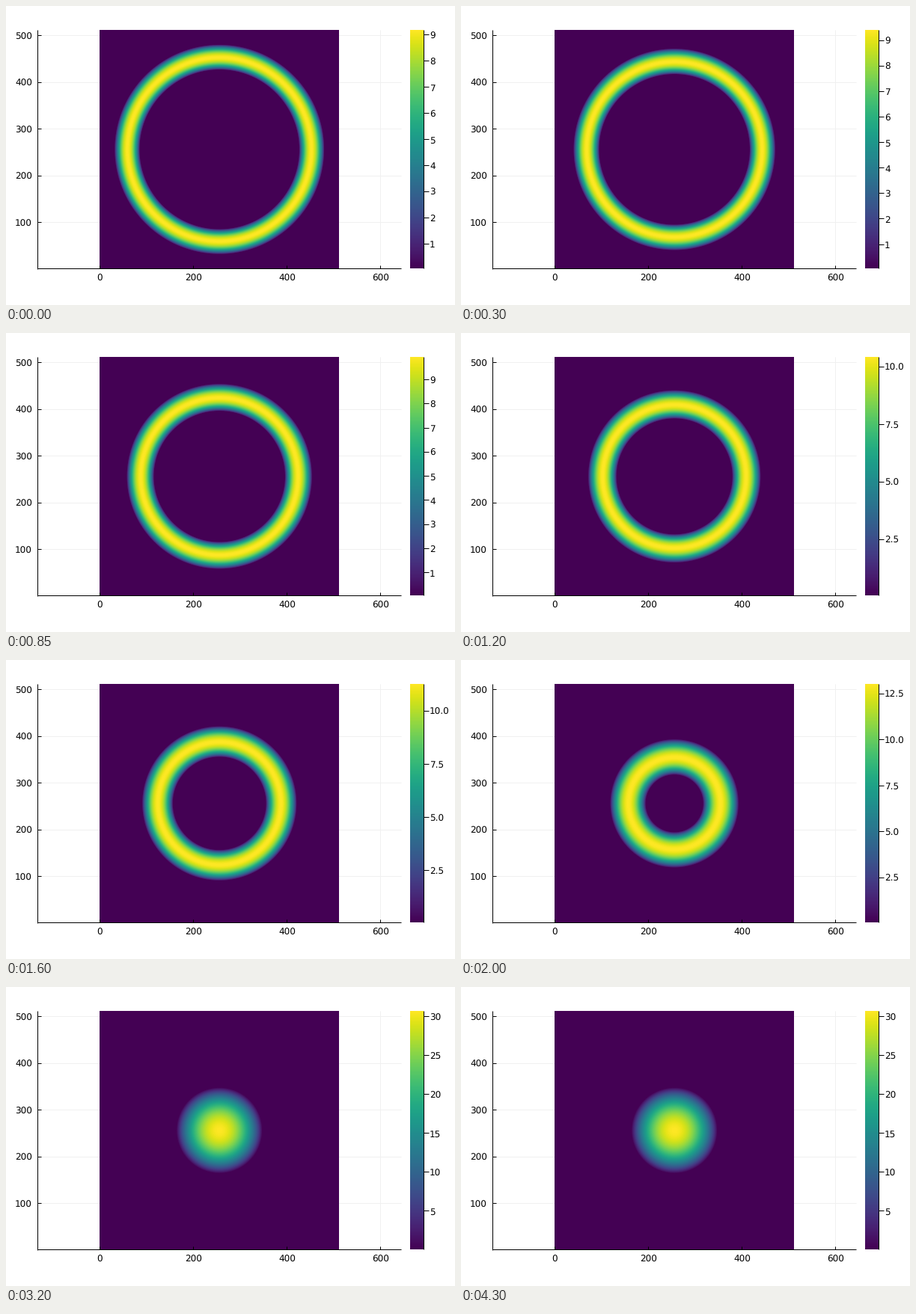
These frames come from a looping animation (600 by 400 pixels, 4950 ms). A matplotlib script:

```python
import numpy as np
import matplotlib.pyplot as plt
from matplotlib.animation import FuncAnimation

plt.rcParams.update({"font.family": "DejaVu Sans", "text.hinting": "none"})

STEP_MS, FRAMES = 50, 99
LEFT, RIGHT, TOP, BOTTOM = 125, 445, 32, 352
AXIS_X, AXIS_Y, AXIS_END = 42.5, 351.5, 528.5
BAR_LEFT, BAR_RIGHT = 540, 558
SCALE = 0.6255              # pixels per grid unit
FLOOR = 0.05                # thickness of the film around the droplet
CLOSING_MS = 2250           # the hole in the ring vanishes
CAP_EDGE, CAP_PEAK = 92, 30.8
MAX_TICKS = 10

px = 0.72                   # one pixel in points at 100 dpi
fig = plt.figure(figsize=(6, 4), dpi=100, facecolor="white")
ax = fig.add_axes([0, 0, 1, 1])

xs = (np.arange(LEFT, RIGHT) + 0.5 - 285.2) / SCALE
ys = (np.arange(TOP, BOTTOM) + 0.5 - 191.8) / SCALE
radius = np.hypot(xs[None, :], ys[:, None])


def film(t):
    """Film height: a shrinking liquid ring that collapses into a cap."""
    if t <= CLOSING_MS:
        ring = np.cbrt(198**3 - 3380 * t) - 0.8
        half = np.sqrt(147000 / ring)
        peak = 0.337 * half * (1 + 0.0006 * (half - 27))
        u = (radius - ring) / half
        p = (1 - u**2) * (1 - 0.05 * np.clip(u, -1, 1))
    else:
        decay = np.exp(-(t - CLOSING_MS) / 70)
        edge = CAP_EDGE + 13 * decay
        dimple = 3 * decay
        peak = CAP_PEAK * (CAP_EDGE / edge) ** 2
        s = (radius / edge) ** 2
        p = (1 - s) * (1 + dimple * (s - 1 / 3))
    return np.maximum(peak * p, FLOOR)


def tick_step(top):
    if top < 10:
        return 1
    return 2.5 if top < 22.5 else 5


def line(x, y, color="black", width=1.0, z=5):
    """Line through the pixels that contain the given points."""
    return ax.plot(np.subtract(x, 0.5), np.subtract(y, 0.5), color=color,
                   lw=width * px, zorder=z, solid_capstyle="butt")[0]


def label(x, y, text, align):
    return ax.text(x, y + 4.9, text, fontsize=12 * px, ha=align,
                   va="baseline", zorder=6)


heat = ax.imshow(np.zeros(radius.shape), cmap="viridis", vmin=0, vmax=1,
                 extent=(LEFT, RIGHT, BOTTOM, TOP), interpolation="nearest",
                 aspect="auto", zorder=2)
ax.imshow(np.linspace(1, 0, BOTTOM - TOP - 1)[:, None], cmap="viridis",
          extent=(BAR_LEFT, BAR_RIGHT, BOTTOM - 1, TOP),
          interpolation="nearest", aspect="auto", zorder=2)

for value in range(0, 601, 200):
    x = 125.2 + value * 0.6257
    line([x, x], [TOP, AXIS_Y], "#f0f0f0", z=1)
    line([x, x], [AXIS_Y, AXIS_Y - 4.5])
    label(x, 363.4, str(value), "center")
for value in range(100, 501, 100):
    y = 352.1 - value * 0.6252
    line([AXIS_X, AXIS_END], [y, y], "#f0f0f0", z=1)
    line([AXIS_X, AXIS_X + 5], [y, y])
    label(35, y, str(value), "right")
line([AXIS_X, AXIS_X], [TOP, AXIS_Y + 0.5])
line([AXIS_X, AXIS_END], [AXIS_Y, AXIS_Y])
line([BAR_RIGHT + 0.5] * 2, [TOP, AXIS_Y])

bar_ticks = [(line([BAR_RIGHT + 0.5, BAR_RIGHT + 7], [0, 0]),
              label(566, 0, "", "left")) for _ in range(MAX_TICKS)]

ax.set_xlim(0, 600)
ax.set_ylim(400, 0)
ax.axis("off")


def update(frame):
    height = film(frame * STEP_MS)
    top = height.max()
    heat.set_data((height - FLOOR) / (top - FLOOR))
    step = tick_step(top)
    for i, (mark, text) in enumerate(bar_ticks, start=1):
        value = i * step
        y = 351.5 - 320 * (value - FLOOR) / (top - FLOOR)
        shown = value <= top
        mark.set_visible(shown)
        text.set_visible(shown)
        mark.set_ydata([y - 0.5, y - 0.5])
        text.set_y(y + 4.9)
        text.set_text(f"{value:.1f}" if step == 2.5 else str(value))
    return []


animation = FuncAnimation(fig, update, frames=FRAMES, interval=STEP_MS,
                          repeat=True, repeat_delay=0)
plt.show()
```
